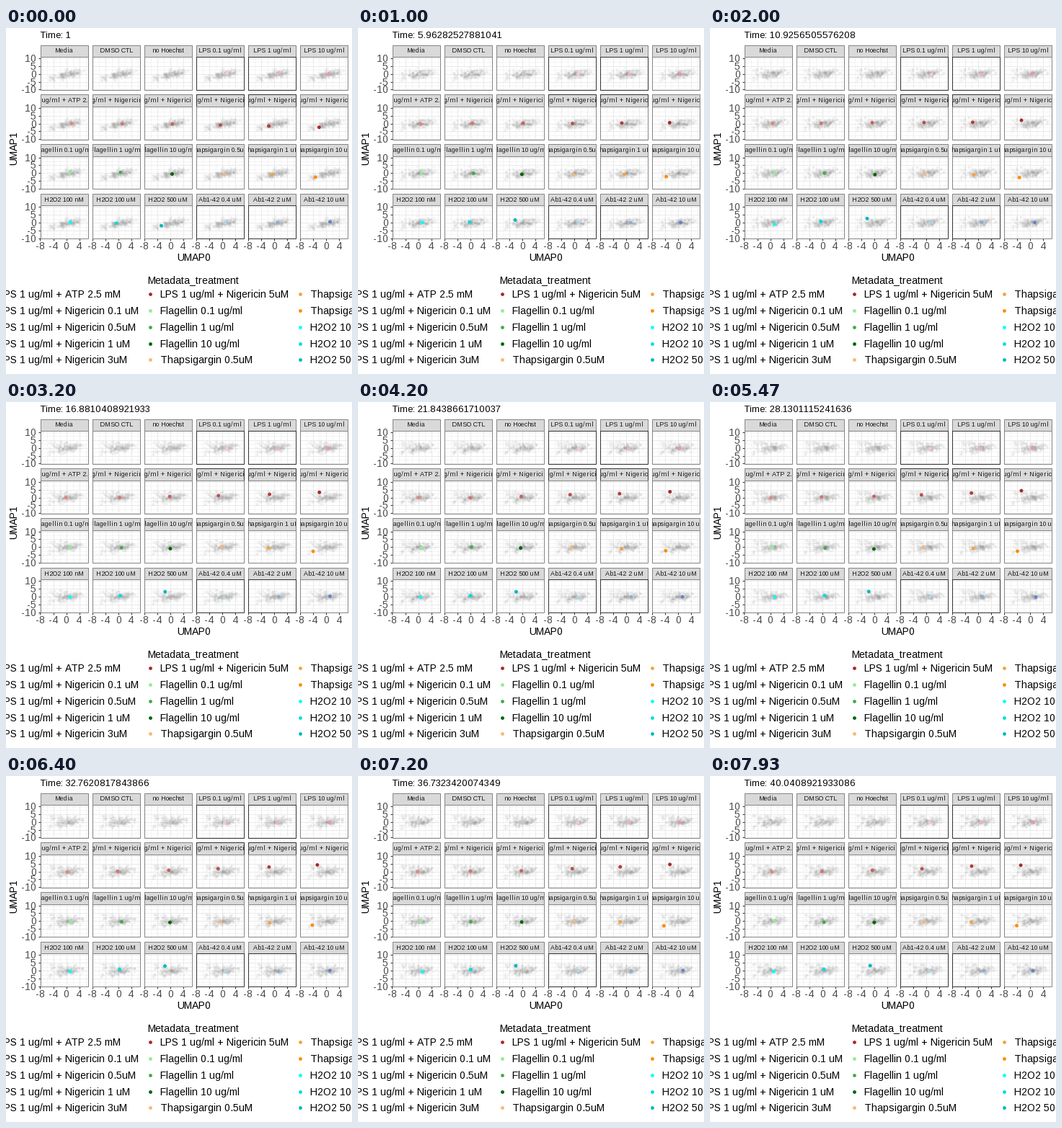
Write a matplotlib script that moves like this. It is 480 px wide and 480 px high and loops after 8000 ms.

```python
import numpy as np
import matplotlib.pyplot as plt
from matplotlib.animation import FuncAnimation
from matplotlib.collections import LineCollection
from matplotlib.colors import to_rgb
from matplotlib.patches import Rectangle

SIZE, DPI = 480, 72
FRAMES, LOOP_MS = 120, 8000
STEP = 89 / 269            # time units per frame
STATES = 42                # whole time units covered by the loop
COLS = 6
LEFT, TOP = 47.5, 23.5     # first strip corner
DX, DY = 72.08, 68.8       # panel pitch
WIDTH, STRIP, HEIGHT = 66.5, 16.5, 45.7
UX, UY = 4.53, 2.17        # pixels per data unit
ZERO_X, ZERO_Y = 36.2, 40.2
WELLS = 8

plt.rcParams.update({
    "font.family": "Liberation Sans",
    "text.hinting": "force_autohint",
    "text.hinting_factor": 1,   # whole-pixel advances
})

rng = np.random.default_rng(7)
names, colors, tracks = [], [], []


def mix(a, b, f):
    return np.asarray(a) * (1 - f) + np.asarray(b) * f


def family(form, doses, shades, start, end, tau=10):
    """Treatments that drift further with dose, easing from start to end.

    start and end each hold the pixel offset for the lowest and highest dose.
    """
    ease = 1 - np.exp(-np.arange(STATES) / tau)[:, None]
    for dose, f in zip(doses, np.linspace(0, 1, len(doses))):
        effect = f ** 1.7
        path = mix(mix(*start, effect), mix(*end, effect), ease)
        names.append(form.format(dose))
        colors.append(mix(*map(to_rgb, shades), f))
        tracks.append(path + rng.normal(0, (1.3, 0.5), path.shape))


family("{}", ("Media", "DMSO CTL", "no Hoechst"), ("#d3d3d3", "#c8c8c8"),
       [(2, 0), (2, 0)], [(0, 0), (0, 0)])
family("LPS {} ug/ml", ("0.1", "1", "10"), ("#fac8d2", "#ee979f"),
       [(5, -1), (3, 1)], [(5, 1), (3, 1)])
family("LPS 1 ug/ml + {}",
       ["ATP 2.5 mM"] + [f"Nigericin {d}" for d in ("0.1 uM", "0.5uM", "1 uM", "3uM", "5uM")],
       ("#e28585", "#a52a2a"), [(6, 0), (-11, 5.5)], [(0, 0.5), (-12.5, -10)])
family("Flagellin {} ug/ml", ("0.1", "1", "10"), ("#90ee90", "#006400"),
       [(6, -2), (0.5, 2.3)], [(4, 1), (-1.5, 2)])
family("Thapsigargin {}", ("0.5uM", "1 uM", "10 uM"), ("#f5b77c", "#ff8c00"),
       [(2, 1.8), (-14, 5.3)], [(-4, 0), (-18.5, 6)])
family("H2O2 {}", ("100 nM", "100 uM", "500 uM"), ("#00ffff", "#00b7bf"),
       [(5, -1), (-10.5, 5)], [(5, 0.8), (-8.5, -7)], tau=4)
family("Ab1-42 {} uM", ("0.4", "2", "10"), ("#add8e6", "#6585cb"),
       [(6, -0.5), (6, -0.5)], [(5, 0.5), (6, 0)])

tracks = np.array(tracks)

# Every well hovers around the path of its treatment; the left side hangs lower.
home = rng.normal(0, (9, 2.3), (len(names), WELLS, 1, 2))
home[..., 1] -= 0.17 * home[..., 0]
jitter = rng.normal(0, (2.2, 0.9), (len(names), WELLS, STATES, 2))
cloud = (tracks[:, None] + home + jitter).reshape(-1, STATES, 2)
cloud = np.clip(cloud, (-24, -9), (24, 9))

corners = np.array([(LEFT + DX * (i % COLS), TOP + DY * (i // COLS))
                    for i in range(len(names))])
zeros = corners + (ZERO_X, ZERO_Y)

fig = plt.figure(figsize=(SIZE / DPI, SIZE / DPI), dpi=DPI, facecolor="white")
ax = fig.add_axes([0, 0, 1, 1])
ax.set_autoscale_on(False)
ax.set_xlim(0, SIZE)
ax.set_ylim(SIZE, 0)
ax.axis("off")


def label(x, y, text, size=14, color="black", ha="left", **kw):
    return ax.text(x, y, text, fontsize=size, color=color, ha=ha,
                   va="baseline", **kw)


def lines(segments, color, width, z):
    ax.add_collection(LineCollection(segments, colors=color, linewidths=width,
                                     zorder=z), autolim=False)


def grid(xs, ys, width):
    segments = []
    for (left, top), (zx, zy) in zip(corners, zeros):
        y0, y1 = top + STRIP, top + STRIP + HEIGHT
        segments += [[(zx + UX * v, y0), (zx + UX * v, y1)] for v in xs]
        segments += [[(left, zy - UY * v), (left + WIDTH, zy - UY * v)] for v in ys]
    lines(segments, "#ebebeb", width, 1)


def box(x, y, height, dark, fill="none"):
    edge = "#333333" if dark else "#858585"
    return ax.add_patch(Rectangle((x, y), WIDTH, height, fc=fill, ec=edge,
                                  lw=1, zorder=5))


def panel(i):
    x, y = corners[i]
    row, col = divmod(i, COLS)
    middle = col in (3, 4)
    strip = box(x, y, STRIP, middle and row == 1, "#d9d9d9")
    box(x, y + STRIP, HEIGHT, middle and row in (0, 3))
    text = label(x + WIDTH / 2, y + 10.7, names[i], 8.5, "#1a1a1a", "center", zorder=6)
    text.set_clip_path(strip)
    text.set_clip_on(True)


def axes_marks():
    ticks = []
    for zy in zeros[::COLS, 1]:
        for v in range(-10, 11, 5):
            y = zy - UY * v
            ticks.append([(LEFT - 2.75, y), (LEFT, y)])
            label(42, y + 5, str(v), color="#4d4d4d", ha="right")
    bottom = TOP + 3 * DY + STRIP + HEIGHT
    for zx in zeros[:COLS, 0]:
        for v in range(-8, 5, 4):
            x = zx + UX * v
            ticks.append([(x, bottom), (x, bottom + 2.75)])
            label(x, 307, str(v), color="#4d4d4d", ha="center")
    lines(ticks, "#333333", 1.07, 4)
    label(261, 323, "UMAP0", ha="center")
    label(15, 166, "UMAP1", ha="center", rotation=90, rotation_mode="anchor")


def legend():
    label(196, 354, "Metadata_treatment")
    for n, i in enumerate(range(6, 21)):
        col, row = divmod(n, 5)
        x, y = (-10, 214, 422)[col], 369.3 + 22.75 * row
        label(x, y + 5, names[i])
        ax.scatter(x - 14, y, s=23, color=[colors[i]], linewidths=0)


grid((-8, -4, 0, 4), range(-10, 11, 5), 1.07)
grid((-6, -2, 2, 6), (-7.5, -2.5, 2.5, 7.5), 0.53)
for i in range(len(names)):
    panel(i)
axes_marks()
legend()

title = label(47, 14, "", 13.2)
wells = ax.scatter([], [], s=13, c="#7f7f7f", alpha=0.07, linewidths=0, zorder=2)
dots = ax.scatter(*zeros.T, s=24, c=colors, linewidths=0, zorder=3)


def at(paths, t):
    i = int(t)
    return mix(paths[:, i], paths[:, i + 1], t - i)


def update(k):
    t = k * STEP
    title.set_text(f"Time: {1 + t:.15g}")
    wells.set_offsets((zeros[:, None] + at(cloud, t)).reshape(-1, 2))
    dots.set_offsets(zeros + at(tracks, t))
    return title, wells, dots


anim = FuncAnimation(fig, update, frames=FRAMES, interval=LOOP_MS / FRAMES,
                     repeat=True, repeat_delay=0)
plt.show()
```
